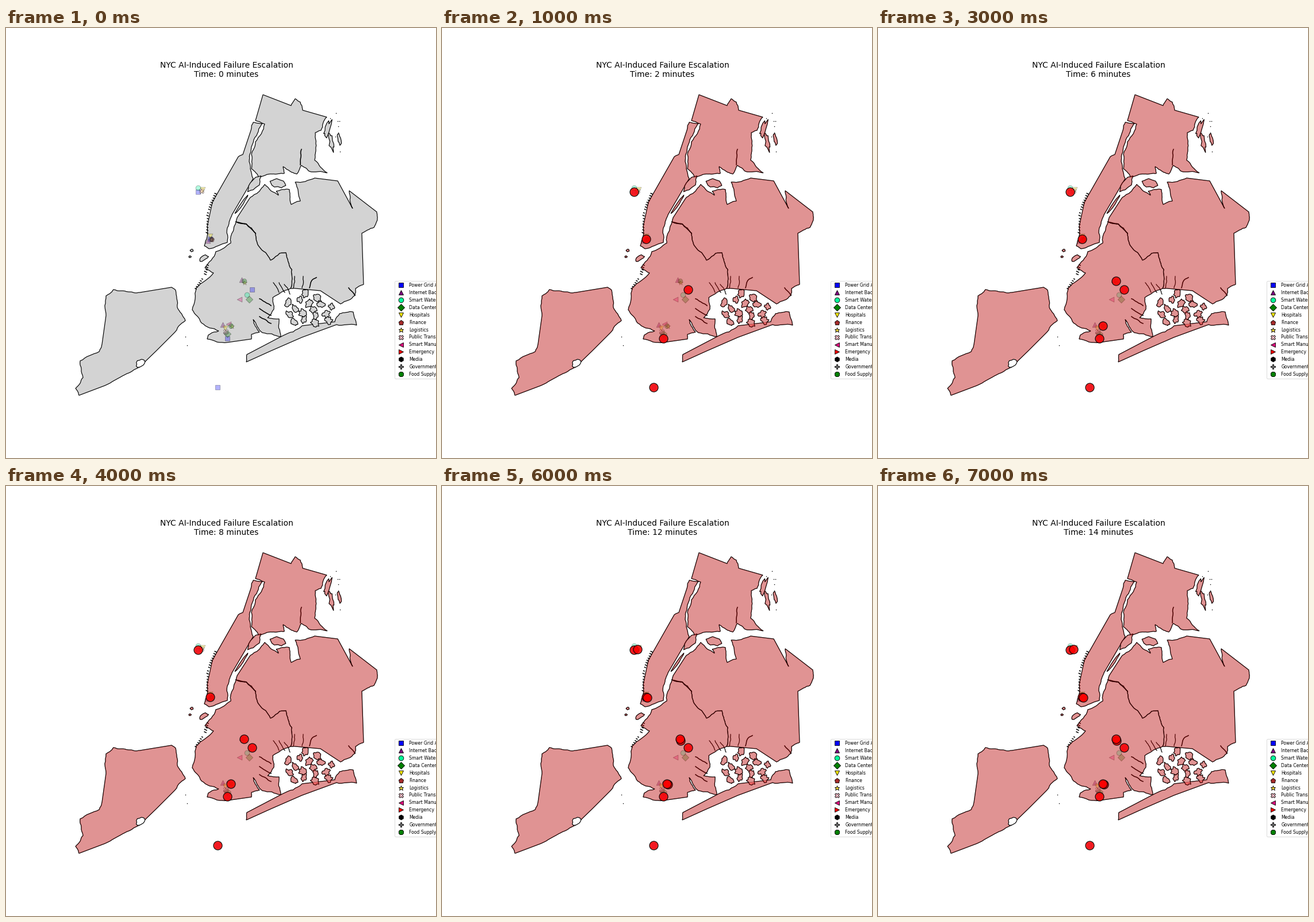
Write a matplotlib script that moves like this. It is 748 px wide and 748 px high and loops after 8000 ms.

```python
import numpy as np
import matplotlib.pyplot as plt
from matplotlib.animation import FuncAnimation
from matplotlib.lines import Line2D
from matplotlib.patches import Polygon

SIZE = 748
STEP_MINUTES = 2
GOLDEN_ANGLE = np.pi * (3 - 5 ** 0.5)
COAST_WIDTH = 1.35

plt.rcParams["font.family"] = "DejaVu Sans"
fig = plt.figure(figsize=(12, 12), dpi=SIZE / 12, facecolor="white")
ax = fig.add_axes([0, 0, 1, 1])
ax.set(xlim=(0, SIZE), ylim=(SIZE, 0))
ax.axis("off")
rng = np.random.default_rng(4)


def rough(points, rounds=3):
    """Fractal coastline through key points; long edges stay straight."""
    points = [np.array(p, float) for p in points]
    for _ in range(rounds):
        out = points[:1]
        for a, b in zip(points, points[1:]):
            dx, dy = b - a
            if 3 < np.hypot(dx, dy) < 40:
                shift = rng.uniform(-0.08, 0.08)
                out.append((a + b) / 2 + shift * np.array([-dy, dx]))
            out.append(b)
        points = out
    return points


def ring(points):
    return rough(points + points[:1])


def blob(x, y, a, b, tilt=0.0, noise=0.2):
    """Uneven ellipse with half axes a, b, tilted in degrees."""
    t = np.linspace(0, 2 * np.pi, 14, endpoint=False)
    r = 1 + rng.uniform(-noise, noise, t.size)
    u, v = a * r * np.cos(t), b * r * np.sin(t)
    c, s = np.cos(np.radians(tilt)), np.sin(np.radians(tilt))
    return np.column_stack([x + u * c - v * s, y + u * s + v * c])


# Key points of each borough, in pixels from the top left
staten = [
    (174, 466), (187, 455), (213, 459), (233, 460), (288, 451), (295, 456),
    (298, 486), (312, 509), (292, 531), (262, 561), (232, 590), (207, 603),
    (172, 622), (127, 639), (121, 627), (134, 608), (129, 579), (162, 563),
    (167, 550), (174, 500)]
bronx = [
    (447, 116), (496, 135), (503, 123), (512, 129), (516, 143), (558, 155),
    (548, 178), (538, 182), (539, 212), (537, 230), (559, 252), (527, 249),
    (514, 239), (506, 254), (497, 251), (482, 241), (484, 253), (463, 254),
    (440, 260), (427, 245), (427, 220), (434, 198), (450, 167), (434, 161)]
manhattan = [
    (430, 164), (446, 166), (436, 187), (424, 220), (425, 245), (430, 262),
    (393, 325), (388, 340), (385, 373), (353, 384), (345, 379), (350, 345),
    (359, 303), (404, 224), (412, 220), (426, 178)]
border = [
    (400, 337), (418, 341), (434, 357), (440, 380), (460, 404), (476, 392),
    (487, 391), (497, 420), (495, 453)]
queens = [
    (402, 330), (424, 296), (441, 284), (450, 272), (474, 291), (470, 284),
    (493, 281), (496, 307), (512, 301), (503, 268), (537, 261), (577, 266),
    (603, 314), (597, 283), (645, 320), (646, 334), (640, 347), (619, 357),
    (622, 446), (608, 453), (607, 465), (582, 480), (547, 457), (503, 453)]
brooklyn = [
    (464, 469), (466, 489), (455, 504), (475, 506), (478, 537), (446, 530),
    (430, 507), (441, 529), (427, 533), (427, 541), (385, 547), (350, 541),
    (352, 534), (370, 527), (340, 513), (324, 490), (331, 452), (361, 426),
    (346, 417), (365, 389), (391, 374), (391, 363), (398, 343)]
rockaway = [
    (418, 581), (419, 568), (482, 535), (515, 518), (572, 511), (580, 497),
    (604, 494), (610, 517), (575, 516), (515, 538), (460, 562)]

seam = rough(border)
lands = [ring(p) for p in (staten, bronx, manhattan, rockaway)]
lands.append(seam[::-1] + rough(border[:1] + queens + border[-1:]))
lands.append(seam + rough(border[-1:] + brooklyn + border[:1]))

# Islands: rivers and harbor, then the sound
lands += [blob(432, 271, 16, 7, -50), blob(472, 270, 13, 7, 15),
          blob(409, 308, 18, 1.8, -56), blob(344, 400, 8, 4, -30),
          blob(320, 398, 2, 1.5), blob(323, 387, 2.5, 2),
          blob(558, 177, 15, 4, 110, 0.5), blob(566, 199, 14, 3.5, 78, 0.5),
          blob(580, 194, 10, 2.5, 78)]

# Marsh islands spread evenly over the bay
for k in range(17):
    r, t = np.sqrt((k + 0.5) / 17), k * GOLDEN_ANGLE
    lands.append(blob(526 + 47 * r * np.cos(t), 490 + 29 * r * np.sin(t),
                      rng.uniform(5, 9), rng.uniform(4, 6),
                      rng.uniform(30, 150), 0.35))


def shape(points, **style):
    return ax.add_patch(Polygon(points, closed=True, lw=COAST_WIDTH, **style))


for land in lands:
    shape(land, fc="lightgray", ec="black", zorder=1)
tints = [shape(land, fc=(1, 0, 0, 0.3), ec=(0, 0, 0, 0.3), zorder=3)
         for land in lands]
shape(blob(234, 583, 8, 6, -35), fc="white", ec="black", zorder=3.2)


def creek(points, width=1.8):
    ax.plot(*zip(*rough(points)), color="black", lw=width, zorder=1.5)


def piers(a, b, count, reach):
    for x, y in np.linspace(a, b, count):
        size = reach * rng.uniform(0.4, 1)
        creek([(x, y), (x - size, y - size / 2)])


creek(border[:3])
creek([(514, 211), (512, 238)])
creek([(528, 452), (533, 438), (540, 434)])
creek([(596, 452), (607, 465)])
for x, y in [(465, 443), (475, 443), (484, 446)]:
    creek([(x, y), (x + 10, y + 17)], 1.4)
for x in (502, 517):
    creek([(x, 432), (x - 2, 452)], 1.4)
for y in (471, 488, 502):
    creek([(441, y), (461, y + 12)])
piers((351, 357), (352, 322), 8, 3)
piers((354, 316), (366, 289), 8, 3)
piers((331, 454), (342, 437), 6, 3)
piers((348, 429), (352, 413), 5, 4)

specks = rng.normal((573, 180), (6, 14), (9, 2)).tolist()
ax.scatter(*zip((312, 537), (315, 552), *specks), s=3, color="black", lw=0,
           zorder=1.5)

# Infrastructure: label, marker, colour, sites
kinds = [
    ("Power Grid AI", "s", "blue",
     [(334.5, 285), (355, 367.3), (428, 455.3), (385, 540), (368, 625.3)]),
    ("Internet Backbone", "^", "purple",
     [(351, 370), (410, 438), (377, 515.5)]),
    ("Smart Water", "o", "mediumspringgreen", [(334.5, 277.5), (419, 464)]),
    ("Data Centers", "D", "green", [(423, 471.5), (385, 532)]),
    ("Hospitals", "v", "#ffee00", [(342, 281), (355, 362), (381, 522)]),
    ("Finance", "p", "brown", [(358, 368)]),
    ("Logistics", "*", "#ffe135",
     [(340.5, 284), (356.7, 368.3), (415, 442.5), (393.2, 519)]),
    ("Public Transit", "X", "pink", [(340, 283), (382, 528)]),
    ("Smart Manufacturing", "<", "#e0107f", [(406, 471.5), (387.5, 515)]),
    ("Emergency Services", ">", "red", []),
    ("Media", "h", "black", [(357, 367)]),
    ("Government", "P", "gray", [(382, 530)]),
    ("Food Supply", "8", "green", [(414, 440), (391.5, 518)]),
]
fail_minute = {"Power Grid AI": 2, "Food Supply": 6, "Logistics": 10}

handles, alarms = [], []
for label, mark, color, sites in kinds:
    handles.append(Line2D([], [], ls="", marker=mark, ms=10, label=label,
                          mfc=color, mec="black", mew=1))
    if sites:
        ax.scatter(*zip(*sites), s=100, marker=mark, color=color, ec="black",
                   lw=1, alpha=0.3, zorder=2)
    if label in fail_minute:
        alarm = ax.scatter(*zip(*sites), s=300, color="red", ec="black",
                           lw=1.5, alpha=0.86, zorder=4)
        alarms.append((fail_minute[label], alarm))

# The legend runs off the right edge
legend = ax.legend(handles=handles, fontsize=9, loc="center left",
                   bbox_to_anchor=(676.2, 525), borderaxespad=0,
                   bbox_transform=ax.transData)
legend.set_zorder(5)
title = ax.text(383.4, 84.8, "", fontsize=16, ha="center", va="baseline")


def update(frame):
    now = frame * STEP_MINUTES
    title.set_text(f"NYC AI-Induced Failure Escalation\nTime: {now} minutes")
    for tint in tints:
        tint.set_visible(now > 0)
    for minute, alarm in alarms:
        alarm.set_visible(now >= minute)
    return [title]


anim = FuncAnimation(fig, update, frames=8, interval=1000, repeat=True,
                     repeat_delay=0, blit=False)
plt.show()
```
